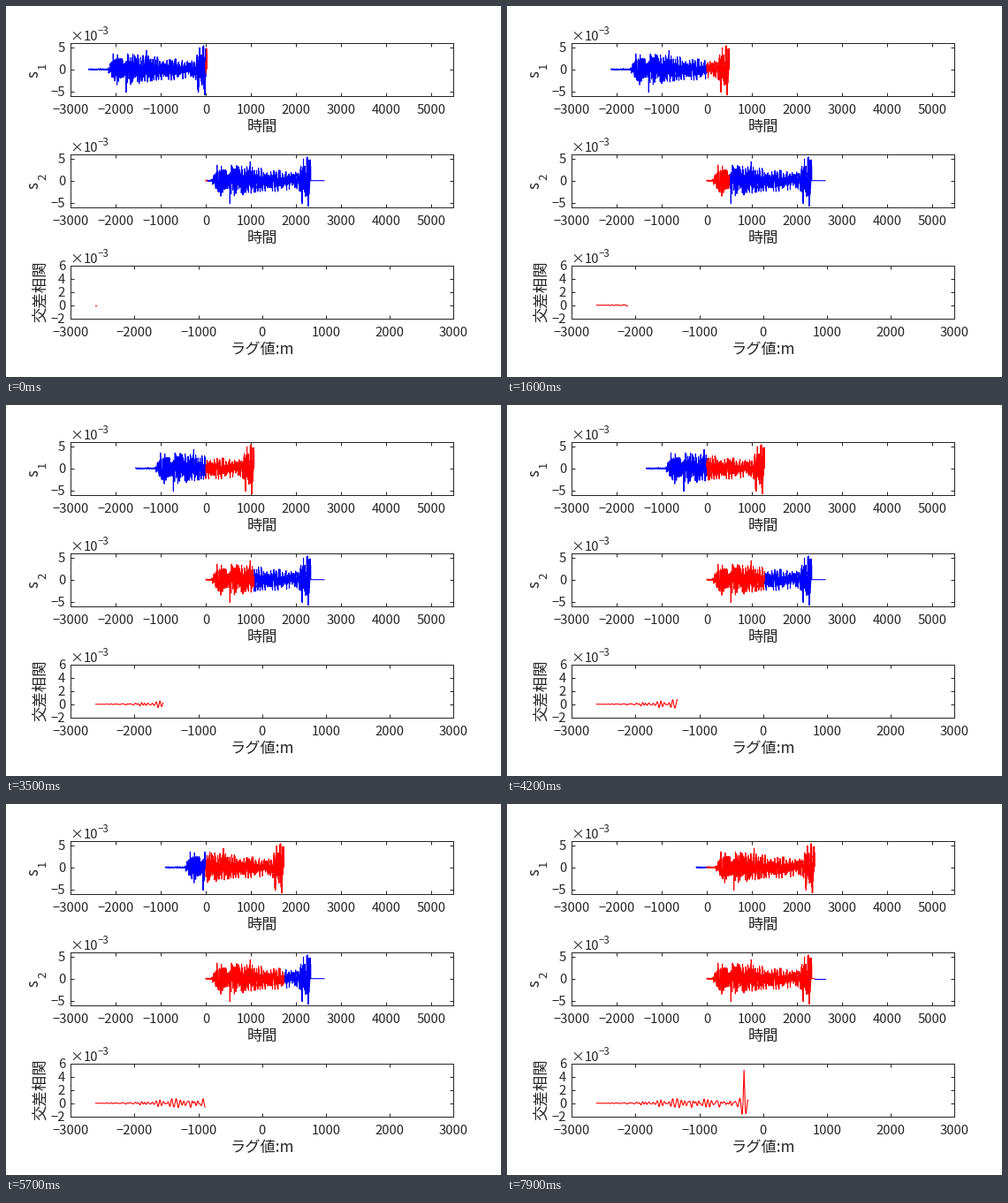
Write a matplotlib script that moves like this. It is 560 px wide and 420 px high and loops after 8 s.

```python
import numpy as np
import matplotlib.pyplot as plt
from matplotlib.animation import FuncAnimation

W, H, DPI = 560, 420, 70
PX = 72 / DPI
INK = "#262626"
LEFT, RIGHT, HEIGHT = 73.3, 506.3, 60
TOP, PITCH = 41.7, 126
FRAMES, INTERVAL, STEP = 80, 100, 30
N, DELAY, START = 2627, 300, -2605

rng = np.random.default_rng(12)
fig = plt.figure(figsize=(W / DPI, H / DPI), dpi=DPI, facecolor="white")


def smooth(x, width):
    k = np.hanning(width + 2)
    return np.convolve(x, k / k.sum(), "same")


def unit(x):
    return x / x.std()


def ramp(x, start, end):
    return np.clip((x - start) / (end - start), 0, 1)


def band_noise(n, period, width):
    phase = 2 * np.pi * np.arange(n) / period
    a, b = (smooth(rng.standard_normal(n), width) for _ in range(2))
    return unit(a * np.cos(phase) + b * np.sin(phase))


def make_signal():
    """Quiet lead-in, long fading rumble, loud burst at the end (units of 1e-3)."""
    i = np.arange(N)
    rumble = ramp(i, 420, 540) * (1.4 - .65 * ramp(i, 900, 2300))
    burst = 1.6 * ramp(i, 2370, 2450)
    noise = unit(unit(smooth(rng.standard_normal(N), 4)) + .6 * band_noise(N, 62, 240))
    s = (.06 + rumble + burst) * np.clip(noise, -2.4, 2.4)
    for at, peak in ((834, -5.2), (1285, 4.3), (2542, 5.2), (2620, 4.7)):
        s[at] = peak
    return s


def make_correlation(lag):
    """Growing ripple followed by a sharp peak where the signals align."""
    d = lag + DELAY
    level = .5 * ramp(lag, START, -DELAY) ** 1.2 * np.clip(-d / 60, 0, 1)
    peak = 5 * np.exp(-np.abs(d) / 27) * np.cos(2 * np.pi * d / 66)
    return level * band_noise(len(lag), 12, 28) + peak


def text(x, y, s, size=14.8, ha="center", rotation=0):
    fig.text(x / W, 1 - y / H, s, size=size * PX, ha=ha, va="baseline", color=INK,
             family="Noto Sans CJK JP", rotation=rotation, rotation_mode="anchor")


def number(v):
    return str(v).replace("-", "\u2212")


def panel(row, xlim, ylim, yticks, xlabel):
    top = TOP + row * PITCH
    bottom = top + HEIGHT
    xticks = range(-3000, xlim[1] + 1, 1000)
    ax = fig.add_axes([LEFT / W, 1 - bottom / H, (RIGHT - LEFT) / W, HEIGHT / H])
    ax.set(xlim=xlim, ylim=ylim, xticks=xticks, yticks=yticks)
    ax.tick_params(direction="in", top=True, right=True, length=4 * PX, width=PX,
                   color=INK, labelbottom=False, labelleft=False)
    for spine in ax.spines.values():
        spine.set(linewidth=PX, color=INK)
    for v in xticks:
        x = LEFT + (v - xlim[0]) / (xlim[1] - xlim[0]) * (RIGHT - LEFT)
        text(x, bottom + 20.3, number(v))
    for v in yticks:
        y = bottom - (v - ylim[0]) / (ylim[1] - ylim[0]) * HEIGHT
        text(67, y + 5.3, number(v), ha="right")
    text(80, top - 3, "\u00d7", 15)
    text(87.5, top - 3, "10", ha="left")
    text(103.5, top - 10, "\u22123", 11.5, "left")
    text(290, bottom + 40.3, xlabel, 17.2)
    return ax


def line(ax, color):
    return ax.plot([], [], color=color, lw=1.1 * PX)[0]


ax1, ax2 = (panel(row, (-3000, 5500), (-6, 6), (-5, 0, 5), "時間") for row in range(2))
ax3 = panel(2, (-3000, 3000), (-2, 6), range(-2, 7, 2), "ラグ値:m")

for row in range(2):
    y = TOP + 35.5 + row * PITCH
    text(37, y, "s", 17, rotation=90)
    text(45, y - 9.5, str(row + 1), 13, rotation=90)
text(43.8, 323, "交差相関", 17.4, rotation=90)

s1 = make_signal()
s2 = np.concatenate([s1[DELAY:], np.zeros(DELAY)])
t = np.arange(N)
lags = np.arange(START - 5, -225, 5)
corr = make_correlation(lags)

blue1, red1 = line(ax1, "blue"), line(ax1, "red")
blue2, red2 = line(ax2, "blue"), line(ax2, "red")
red3 = line(ax3, "red")


def update(i):
    m = START + STEP * i
    cut, end = -m, N + m
    blue1.set_data(t[:cut + 1] + m, s1[:cut + 1])
    red1.set_data(t[cut:] + m, s1[cut:])
    red2.set_data(t[:end], s2[:end])
    blue2.set_data(t[end - 1:], s2[end - 1:])
    shown = lags <= m
    red3.set_data(lags[shown], corr[shown])
    return blue1, red1, blue2, red2, red3


anim = FuncAnimation(fig, update, frames=FRAMES, interval=INTERVAL,
                     repeat=True, repeat_delay=0, blit=False)
plt.show()
```
